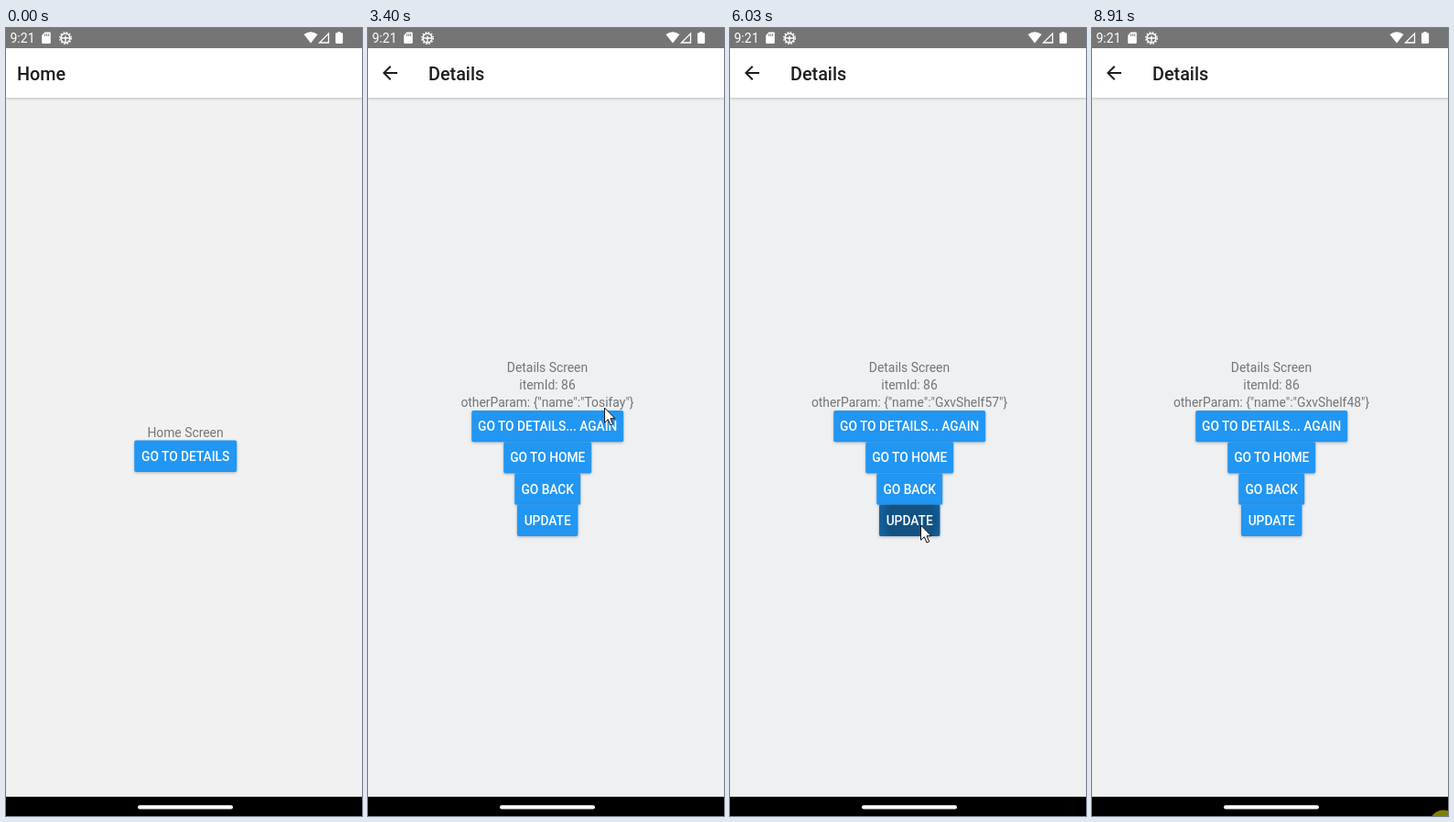
An HTML page for the animation above (9.02 s loop, 389 px wide and 859 px high).

```html
<!DOCTYPE html>
<html lang="en">
<head>
<meta charset="utf-8">
<title>Details params</title>
<style>
  html, body { margin: 0; width: 100%; height: 100%; overflow: hidden; background: #f1f1f1; }
  #stage { display: block; width: 100vw; height: 100vh; font-family: Roboto, sans-serif; }
  .header { fill: #fff; filter: drop-shadow(0 1px 1.5px rgba(0, 0, 0, .22)); }
  .title { font-size: 19.8px; font-weight: 500; fill: #1c1c1e; }
  .body { font-size: 13.87px; fill: #737475; text-anchor: middle; }
  .face { fill: #2196f3; filter: drop-shadow(0 1.5px 1.5px rgba(0, 0, 0, .25)); }
  .label { font-size: 13.75px; font-weight: 500; fill: #fff; text-anchor: middle; }
</style>
</head>
<body>
<svg id="stage" viewBox="0 0 389 859" preserveAspectRatio="none">
  <defs>
    <radialGradient id="soft">
      <stop offset=".6" stop-color="#000"/>
      <stop offset="1" stop-color="#000" stop-opacity="0"/>
    </radialGradient>
  </defs>

  <g id="home">
    <rect y="22" width="393" height="816" fill="#f1f1f1"/>
    <rect class="header" y="22" width="393" height="54"/>
    <text class="title" x="12" y="57">Home</text>
    <text class="body" x="196" y="445.7">Home Screen</text>
  </g>

  <g id="details">
    <rect y="22" width="393" height="816" fill="#eff0f2"/>
    <rect class="header" y="22" width="393" height="54"/>
    <path transform="translate(12 37)" fill="#1c1c1e"
      d="M20 11H7.83l5.59-5.59L12 4l-8 8 8 8 1.41-1.41L7.83 13H20z"/>
    <text class="title" x="66" y="57">Details</text>
    <text class="body" x="196" y="375.4">Details Screen</text>
    <text class="body" x="196" y="394.2">itemId: 86</text>
    <text class="body" id="param" x="196" y="413"></text>
  </g>

  <g id="status" fill="#fff">
    <rect width="389" height="22" fill="#757575"/>
    <text x="4.5" y="16" font-size="14">9:21</text>
    <path d="M42.5 4.5h5q1.3 0 1.3 1.3v9.9q0 1.3-1.3 1.3h-7q-1.3 0-1.3-1.3V8z"/>
    <path d="M42.7 6.3v2.6M44.7 6.3v2.6M46.7 6.3v2.6" stroke="#757575"/>
    <g fill="none" stroke="#fff" stroke-width="1.4">
      <circle cx="65" cy="11" r="5"/>
      <circle cx="65" cy="11" r="6.3" stroke-dasharray="1.65 1.65"/>
      <path d="M60 11h10M65 11v5M65 8.5v2.5"/>
    </g>
    <path d="M333 16.5L325.5 7q7.5-5.6 15 0z"/>
    <path d="M352.5 6v10h-10z" fill="none" stroke="#fff" stroke-width="1.3"/>
    <path d="M362.5 4h3v1.3h1.4q1.2 0 1.2 1.2v9.3q0 1.2-1.2 1.2h-5.700q-1.200 0-1.200-1.200V6.500q0-1.200 1.200-1.200h1.300z"/>
  </g>
  <rect y="838" width="389" height="21"/>
  <rect x="144" y="847.3" width="104" height="4.200" rx="2.100" fill="#fff"/>

  <circle id="halo" r="15.500" fill="#ff0" fill-opacity=".5"/>
  <path id="cursor" d="M0 0V16.200L3.800 12.700 6.500 19 9.200 17.800 6.500 11.700H11.500z"
    fill="#fff" stroke="#111" stroke-width="1" stroke-linejoin="round"/>
</svg>

<script>
const LOOP = 9020, OPEN_AT = 1980, OPEN_MS = 400;
const HOME_TAP = 1640, STOP_TAP = 8910, FIRST_TAP = 4770, TAP_GAP = 475, RELEASE = 200;
const names = ['GxvShelf31', 'GxvShelf74', 'GxvShelf57', 'GxvShelf26', 'GxvShelf8', 'GxvShelf63', 'GxvShelf48'];
const updateTaps = names.map((_, i) => FIRST_TAP + i * TAP_GAP);
const allTaps = [HOME_TAP, ...updateTaps, STOP_TAP];

// time, x, y of the pointer tip
const route = [
  [530, 366, 555], [740, 235, 580], [930, 98, 560], [1220, 184, 467.500],
  [2690, 184, 467.500], [2950, 220, 402], [3130, 244, 394], [3400, 258.500, 414],
  [3600, 259, 412], [3660, 259, 412], [3810, 262, 410], [4000, 262, 410],
  [4150, 294, 455], [4290, 303, 508], [4430, 250, 541], [4570, 208.500, 542],
  [7900, 208.500, 542], [8100, 250, 588], [8240, 308, 680], [8380, 357, 796],
  [8500, 372, 836], [8590, 384, 868], [LOOP, 384, 868]
];

const $ = id => document.getElementById(id);
const clamp = v => Math.max(0, Math.min(1, v));
const ramp = (v, from, to) => clamp((v - from) / (to - from));

function add(parent, tag, attrs, text = '') {
  const el = document.createElementNS('http://www.w3.org/2000/svg', tag);
  for (const key in attrs) el.setAttribute(key, attrs[key]);
  el.textContent = text;
  return parent.appendChild(el);
}

function addButton(parent, label, y, width, height = 34.3) {
  const x = 196.2 - width / 2;
  add(parent, 'rect', { class: 'face', x, y, width, height, rx: 2 });
  const clip = add(parent, 'svg', { x, y, width, height });
  const flat = add(clip, 'rect', { width, height, rx: 2, opacity: 0 });
  const wave = add(clip, 'circle', { cy: height / 2, fill: 'url(#soft)', opacity: 0 });
  add(parent, 'text', { class: 'label', x: 196.2, y: y + 22.2 }, label);
  return { flat, wave, width };
}

const goButton = addButton($('home'), 'GO TO DETAILS', 449.6, 112);
addButton($('details'), 'GO TO DETAILS... AGAIN', 417, 166);
addButton($('details'), 'GO TO HOME', 451.2, 96);
addButton($('details'), 'GO BACK', 485.4, 72);
const updateButton = addButton($('details'), 'UPDATE', 519.6, 66.500);

const bezier = (a, b, c, d, s) => {
  const r = 1 - s;
  return a * r * r * r + 3 * b * r * r * s + 3 * c * r * s * s + d * s * s * s;
};

// Android's two-part "fast out, extra slow in" curve
function extraSlowIn(v) {
  const [xs, ys] = v < 1 / 6
    ? [[0, .05, .1333, 1 / 6], [0, 0, .06, .4]]
    : [[1 / 6, .2083, .25, 1], [.4, .82, 1, 1]];
  let lo = 0, hi = 1;
  for (let i = 0; i < 24; i++) {
    const mid = (lo + hi) / 2;
    if (bezier(...xs, mid) < v) lo = mid; else hi = mid;
  }
  return bezier(...ys, lo);
}

function slope(i, axis) {
  if (i === 0 || i === route.length - 1) return 0;
  const rate = j => (route[j + 1][axis] - route[j][axis]) / (route[j + 1][0] - route[j][0]);
  const a = rate(i - 1), b = rate(i);
  return a * b <= 0 ? 0 : 2 * a * b / (a + b);
}

function pointerAt(t) {
  let i = 0;
  while (i < route.length - 2 && t >= route[i + 1][0]) i++;
  const [start, end] = [route[i], route[i + 1]];
  const span = end[0] - start[0], s = ramp(t, start[0], end[0]);
  return [1, 2].map(axis => bezier(
    start[axis], start[axis] + slope(i, axis) * span / 3,
    end[axis] - slope(i + 1, axis) * span / 3, end[axis], s));
}

function drawRipple(button, taps, t) {
  const strength = age => ramp(age, 60, 140) * (1 - ramp(age, 330, 640));
  const flat = Math.max(...taps.map(tap => strength(t - tap)));
  const age = t - (taps.filter(tap => tap <= t).pop() ?? Infinity);
  const grow = ramp(age, 70, 380);
  button.flat.setAttribute('opacity', .26 * flat);
  button.wave.setAttribute('opacity', .26 * strength(age));
  button.wave.setAttribute('r', 8 + grow * button.width * .68);
  button.wave.setAttribute('cx', button.width / 2 + 8 * (1 - grow));
}

function scaleCard(card, scale) {
  card.setAttribute('transform', `translate(196.2 430) scale(${scale}) translate(-196.2 -430)`);
}

function draw(t) {
  const opened = t - OPEN_AT;
  const p = extraSlowIn(clamp(opened / OPEN_MS));
  scaleCard($('home'), 1 + .15 * p);
  scaleCard($('details'), .85 + .15 * p);
  $('details').setAttribute('opacity', ramp(opened, 103, 203));
  $('home').style.display = opened > OPEN_MS ? 'none' : '';

  const done = updateTaps.filter(tap => t >= tap + RELEASE).length;
  const name = done ? names[done - 1] : 'Tosifay';
  $('param').textContent = `otherParam: {"name":"${name}"}`;

  drawRipple(goButton, [HOME_TAP], t);
  drawRipple(updateButton, updateTaps, t);

  const at = `translate(${pointerAt(t).join(' ')})`;
  $('cursor').setAttribute('transform', at);
  $('halo').setAttribute('transform', at);
  $('cursor').style.display = t < route[0][0] ? 'none' : '';
  $('halo').style.display = allTaps.some(tap => t >= tap && t < tap + RELEASE) ? '' : 'none';
}

const began = performance.now();
function tick() {
  draw((performance.now() - began) % LOOP);
  requestAnimationFrame(tick);
}
tick();
</script>
</body>
</html>
```
